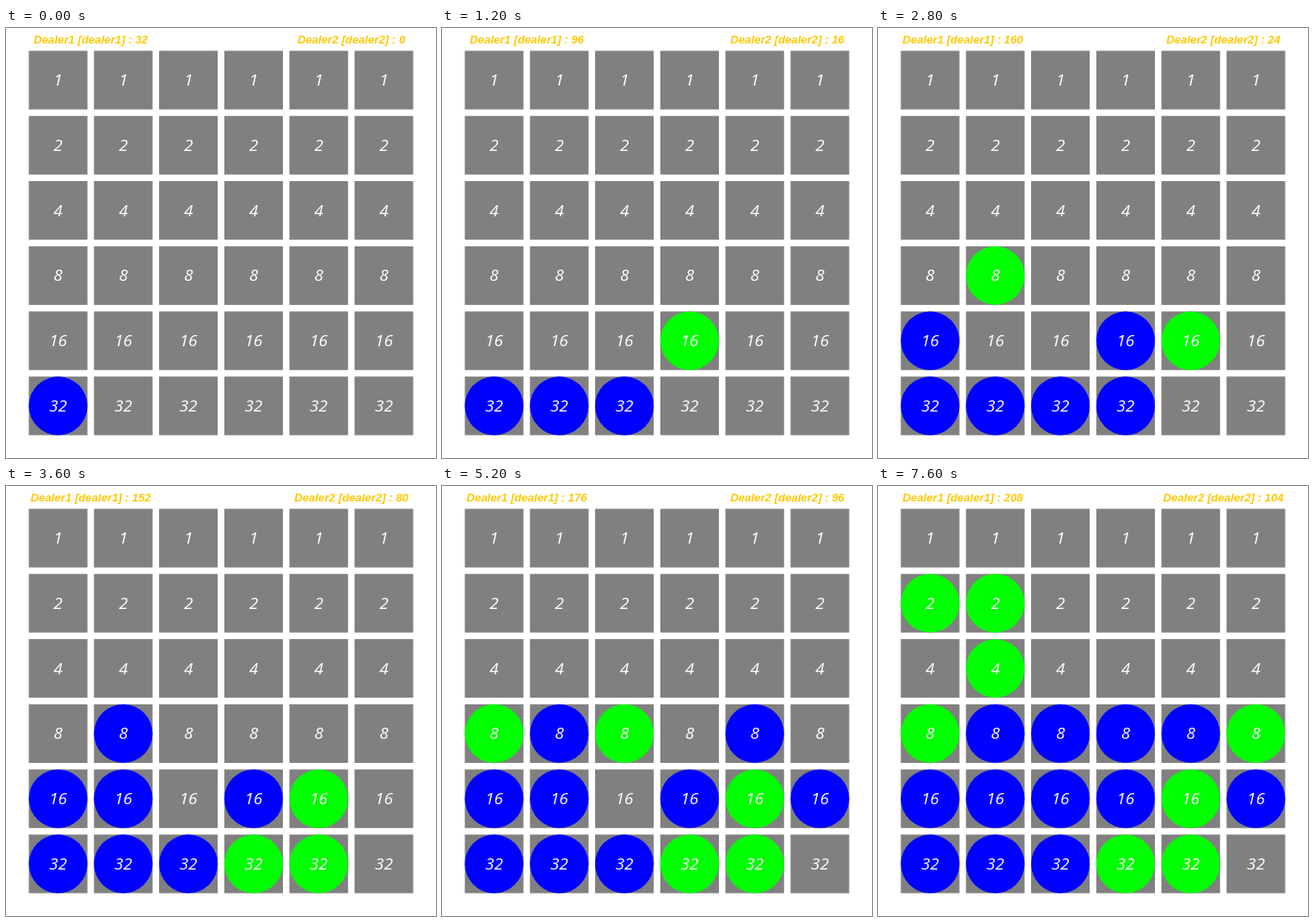
These frames come from a looping animation (500x500 px, 8000 ms). An HTML page:

```html
<!DOCTYPE html>
<html lang="en">
<head>
<meta charset="utf-8">
<title>Board game</title>
<style>
  html, body { margin: 0; width: 100%; height: 100%; overflow: hidden; background: #fff; }
  svg { display: block; width: 100vw; height: 100vh; }
  text { text-anchor: middle; font-style: italic; }
  .num { font-family: "Open Sans", sans-serif; font-size: 19px; fill: #fff; }
  .score { font-family: "Liberation Sans", Arial, sans-serif; font-size: 13.2px; font-weight: bold; fill: #ffc800; }
  .cell { fill: #808080; }
</style>
</head>
<body>
<svg id="stage" viewBox="0 0 500 500"></svg>
<script>
const SIDE = 6, PITCH = 500 / 6.6, SIZE = PITCH * 0.9;
const START = (500 - PITCH * (SIDE - 1) - SIZE) / 2;
const STEP = 400, LOOP = 8000;
const COLORS = ['#00f', '#0f0'];
const NAMES = ['Dealer1 [dealer1]', 'Dealer2 [dealer2]'];

// One move per step, players alternating: "column row", then any captured cell.
const MOVES = ['05', '25', '15 25', '34', '35 34', '44', '04', '13', '14 13', '45 35',
               '54', '03', '43', '23', '24 23', '53', '33', '12', '01', '11 01'];

const stage = document.getElementById('stage');

function add(tag, attrs, text = '') {
  const el = document.createElementNS('http://www.w3.org/2000/svg', tag);
  for (const key in attrs) el.setAttribute(key, attrs[key]);
  el.textContent = text;
  return stage.appendChild(el);
}

const discs = {};
for (let row = 0; row < SIDE; row++) {
  for (let col = 0; col < SIDE; col++) {
    const x = START + col * PITCH, y = START + row * PITCH;
    const cx = x + SIZE / 2, cy = y + SIZE / 2;
    add('rect', { class: 'cell', x, y, width: SIZE, height: SIZE });
    discs[`${col}${row}`] = add('circle', { cx, cy, r: SIZE / 2, fill: 'none' });
    add('text', { class: 'num', x: cx, y: cy + 6.5 }, 2 ** row);
  }
}
const labels = [98.6, 401.6].map(x => add('text', { class: 'score', x, y: 17.6 }));

function show(step) {
  const owner = {}, score = [0, 0];
  MOVES.slice(0, step + 1).forEach((move, i) => {
    for (const cell of move.split(' ')) owner[cell] = i % 2;
  });
  for (const cell in discs) {
    const player = owner[cell];
    discs[cell].setAttribute('fill', COLORS[player] || 'none');
    if (player !== undefined) score[player] += 2 ** cell[1];
  }
  labels.forEach((label, i) => { label.textContent = `${NAMES[i]} : ${score[i]}`; });
}

const begin = performance.now();
let shown = -1;

function tick() {
  const step = Math.floor((performance.now() - begin) % LOOP / STEP);
  if (step !== shown) show(shown = step);
  requestAnimationFrame(tick);
}
tick();
</script>
</body>
</html>
```
